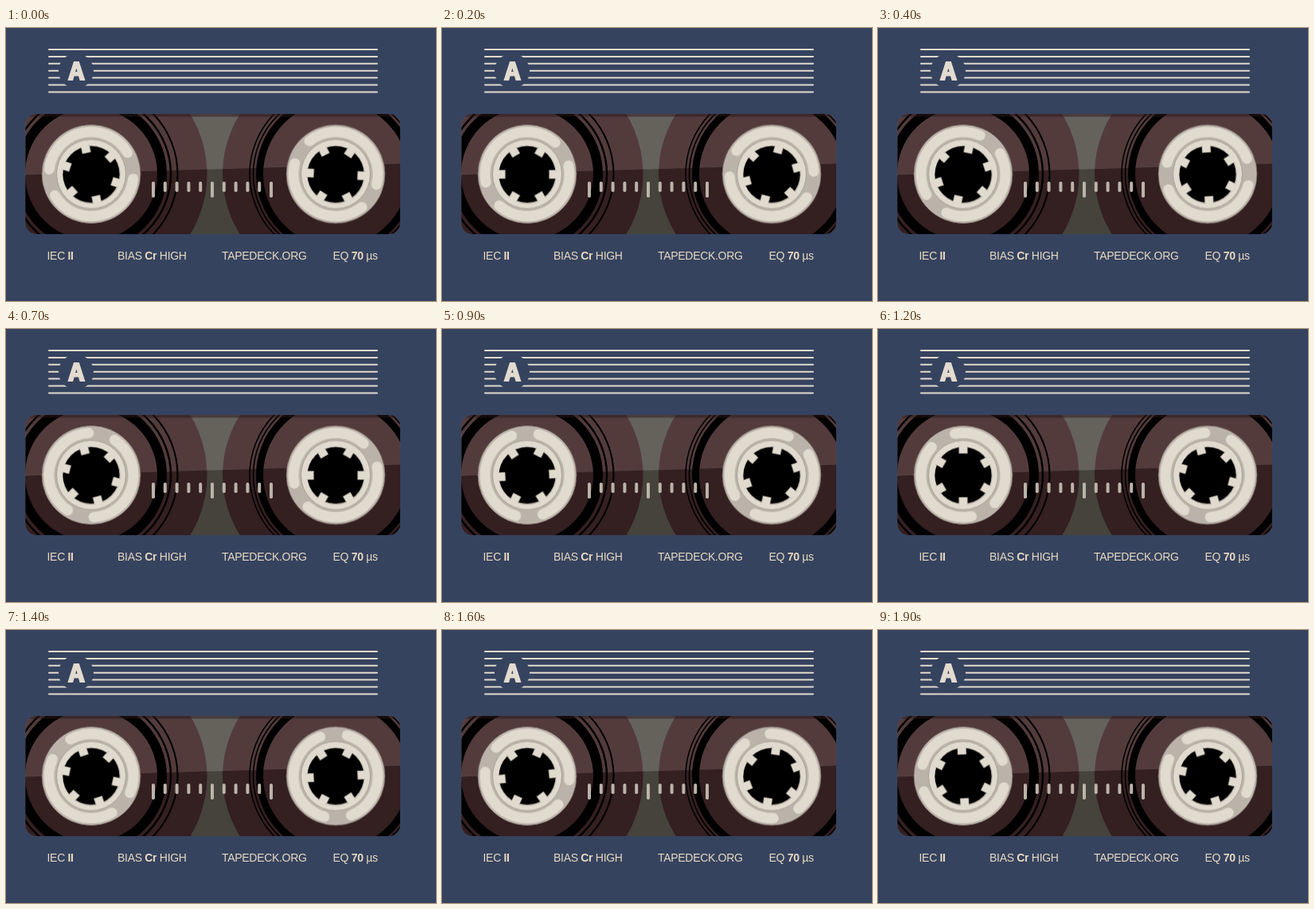
Write an HTML page that moves like this. It is 540 px wide and 343 px high and loops after 2 s.

```html
<!DOCTYPE html>
<html lang="en">
<head>
<meta charset="utf-8">
<title>Cassette</title>
<style>
  html, body { margin: 0; width: 100%; height: 100%; overflow: hidden; background: #36435f; }
  svg { display: block; width: 540px; height: 343px; }
  .label { font: 14px "Liberation Sans", Arial, sans-serif; letter-spacing: -.3px; fill: #e8dac2; }
  .label tspan { font-weight: 700; }
  .side { font: 900 29.5px "Noto Sans CJK JP", "Noto Sans CJK", Roboto, sans-serif; text-anchor: middle;
    fill: #e3dbd0; stroke: #e3dbd0; stroke-width: 2.2px; }
</style>
</head>
<body>
<svg id="stage" viewBox="0 0 540 343"></svg>
<script>
const LIGHT = '#e1dace', GRAY = '#bbb3a9', BLUE = '#36435f';
const HUB_Y = 183.5;
const hubs = [{ x: 107, turn: -42 }, { x: 414, turn: 3 }];
const range = n => [...Array(n).keys()];

const circle = (x, y, r, attrs) => `<circle cx="${x}" cy="${y}" r="${r}" ${attrs}/>`;
const ring = (x, r, width) => circle(x, HUB_Y, r, `fill="none" stroke="#000" stroke-width="${width}"`);
const polar = (r, deg) => {
  const a = deg * Math.PI / 180;
  return `${(r * Math.cos(a)).toFixed(2)} ${(r * Math.sin(a)).toFixed(2)}`;
};

function header() {
  const lines = range(7).map(i => `M54 ${27 + i * 8.9}H466`).join('');
  return `<path d="${lines}" stroke="${LIGHT}" stroke-width="2" stroke-linecap="round"/>
    ${circle(88, 54, 22, `fill="${BLUE}"`)}
    <text class="side" x="88.5" y="65.2">A</text>`;
}

// Tape packs in front of the see-through middle, painted once per light level.
function packs(clip, middle, brown) {
  return `<g clip-path="url(#${clip})"><rect x="24" y="108" width="472" height="152" fill="${middle}"/>
    ${circle(107, HUB_Y, 145.5, `fill="${brown}"`)}${circle(414, HUB_Y, 142, `fill="${brown}"`)}</g>`;
}

function cassetteWindow() {
  return `<g clip-path="url(#window)">
    ${packs('upper', '#65625c', '#533b3c')}${packs('lower', '#45433b', '#341f21')}
    ${ring(107, 89, 12)}${ring(107, 100, 2.4)}${ring(107, 108.5, 2)}
    ${ring(414, 95.5, 9)}${ring(414, 103.5, 1.6)}${ring(414, 108, 1.6)}
    <rect x="24" y="108" width="472" height="3.5" fill="#2a1819" opacity=".5"/></g>`;
}

function ticks() {
  return range(11).map(i =>
    `<rect x="${183 + i * 14.8}" y="193" width="4" height="${i % 5 ? 13 : 20}" rx="1.8" fill="${GRAY}"/>`).join('');
}

function hub({ x, turn }) {
  const arc = start => `M${polar(53, start)}A53 53 0 0 1 ${polar(53, start + 143)}`;
  const teeth = range(6).map(i =>
    `<g transform="rotate(${i * 60})"><rect x="27.3" y="-5.5" width="10" height="11" fill="${GRAY}"/>
     <rect x="28" y="-5" width="10" height="10" fill="${LIGHT}"/></g>`).join('');
  return `<g transform="translate(${x} ${HUB_Y})">
    ${circle(0, 0, 62, `fill="${GRAY}" stroke="#6f6160" stroke-width=".8"`)}
    <g transform="rotate(${turn})"><g class="spin">
      <path d="${arc(48.5)}${arc(228.5)}" fill="none" stroke="${LIGHT}" stroke-width="13" stroke-linecap="round"/>
    </g></g>
    ${circle(0, 0, 43.5, `fill="${LIGHT}" stroke="#a89f96" stroke-width="1"`)}
    ${circle(0.4, 0.8, 36.4, `fill="${GRAY}"`)}${circle(0, 0.4, 35.6, 'fill="#000"')}
    <g transform="translate(0 .4) rotate(${turn})"><g class="spin">${teeth}</g></g>
  </g>`;
}

document.getElementById('stage').innerHTML = `
  <defs>
    <clipPath id="window"><rect x="24.5" y="108" width="470.5" height="151" rx="14"/></clipPath>
    <clipPath id="upper"><path d="M24 108H496V171L24 185Z"/></clipPath>
    <clipPath id="lower"><path d="M24 184.5L496 170.5V260H24Z"/></clipPath>
  </defs>
  <rect width="540" height="343" fill="${BLUE}"/>
  ${header()}${cassetteWindow()}${ticks()}${hubs.map(hub).join('')}
  <g class="label">
    <text x="51.5" y="291">IEC <tspan>II</tspan></text>
    <text x="140" y="291">BIAS <tspan>Cr</tspan> HIGH</text>
    <text x="271" y="291">TAPEDECK.ORG</text>
    <text x="410.5" y="291">EQ <tspan>70</tspan> µs</text>
  </g>`;

// Half a turn looks the same as none, so the loop closes cleanly.
for (const part of document.querySelectorAll('.spin')) {
  part.animate({ transform: ['rotate(0deg)', 'rotate(-180deg)'] },
    { duration: 2000, iterations: Infinity, easing: 'steps(20, end)' });
}
</script>
</body>
</html>
```
